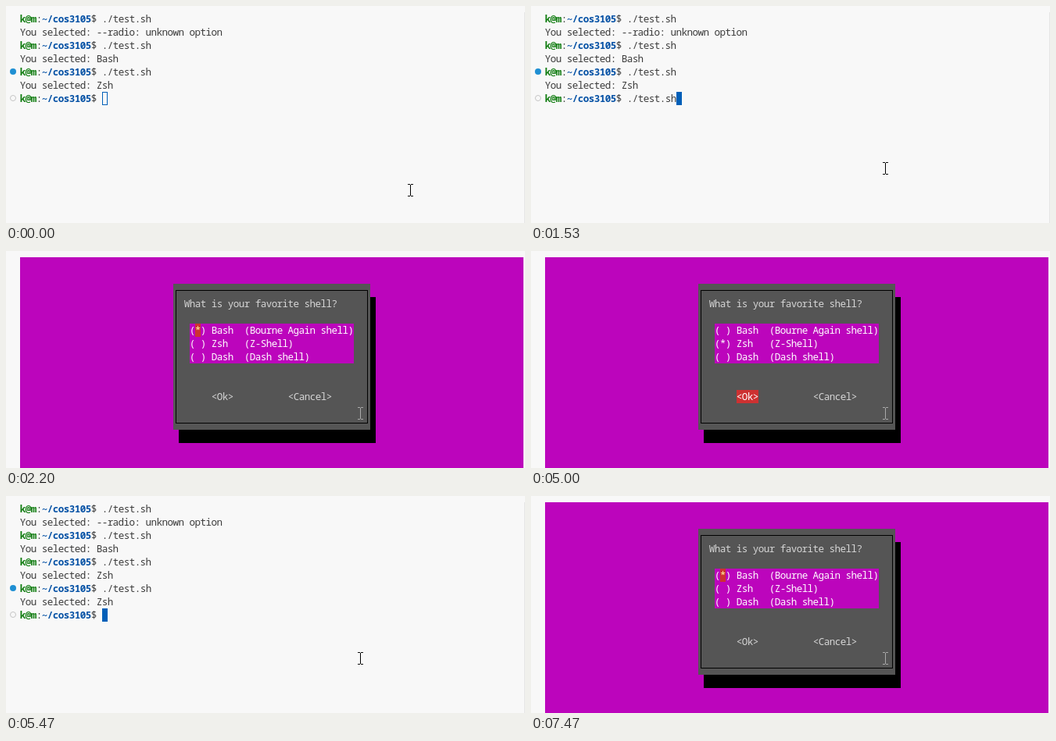
Animation of 664x278 px, one loop 8 s. Source, as an HTML page:

```html
<!DOCTYPE html>
<html lang="en">
<head>
<meta charset="utf-8">
<title>Shell picker</title>
<style>
html, body { margin: 0; width: 100%; height: 100%; overflow: hidden; background: #f8f8f8; }
body {
  position: relative; color: #3b3b3b;
  font: 500 12.6px/17px "Noto Sans Mono", "DejaVu Sans Mono", monospace;
  letter-spacing: calc(7px - .6em);
}
div, i, svg { position: absolute; }
.row { left: calc(17.7px + var(--c, 0) * 7px); top: calc(8px + var(--r) * 17px); height: 17px; white-space: pre; }
b { color: #107c10; }
b + b { color: #0451a5; }
.layer { inset: 0; }
.anim { animation: 8s step-end infinite; }

.edge { right: 0; top: 8px; bottom: 0; width: 1px; background: #e5e5e5; }
.dot, .ring { border-radius: 50%; box-sizing: border-box; }
.dot { left: 4.7px; top: 79.7px; width: 8.6px; height: 8.6px; background: #1f8fd3; }
.ring { left: 5px; top: 114px; width: 8px; height: 8px; border: 1.6px solid #c4c4c4; }
.cursor { left: 123px; top: 110px; width: 7px; height: 17px; box-sizing: border-box; border: 1px solid #005fb8; animation-name: cursor; }
.term { animation-name: term; }
.live { animation-name: live; }
.later { animation-name: later; }
.cmd1 { animation-name: cmd1; }
.cmd2 { animation-name: cmd2; }

.dialog { color: #d6d6d6; animation-name: dialog; }
.back { left: 18px; top: 8px; width: 644px; bottom: 0; background: #bc05bc; }
.shadow, .box { width: 252px; height: 187px; }
.shadow { left: 221px; top: 59px; background: #000; }
.box { left: 214px; top: 42px; background: #555; }
.frame { left: 217px; top: 50px; width: 244px; height: 169px; border: 1px solid #000; }
.list { left: 235px; top: 93px; width: 210px; height: 51px; background: #bc05bc; }
.item { color: #fff; }
.hot, .pick { height: 17px; background: #cd3131; }
.hot { left: 242px; top: 93px; width: 7px; animation-name: hot; }
.star { animation-name: star; }
.pick { left: 263px; top: 178px; width: 28px; }
.ok { color: #fff; animation-name: ok; }

.mouse { left: 0; top: 0; width: 7px; height: 16px; animation: move 8s infinite, tint 8s step-end infinite; }

@keyframes term { 0%, 68.375% { opacity: 1 } 27.5%, 93.375%, 100% { opacity: 0 } }
@keyframes dialog { 0%, 68.375% { opacity: 0 } 27.5%, 93.375%, 100% { opacity: 1 } }
@keyframes live { 0% { transform: none } 68.375%, 100% { transform: translateY(34px) } }
@keyframes later { 0% { opacity: 0 } 68.375%, 100% { opacity: 1 } }
@keyframes cmd1 { 0% { opacity: 0 } 19.125%, 100% { opacity: 1 } }
@keyframes cmd2 { 0% { opacity: 0 } 89.125%, 100% { opacity: 1 } }
@keyframes cursor {
  0% { background: transparent; transform: none }
  5.875%, 68.375% { background: #005fb8; transform: none }
  19.125%, 89.125%, 100% { background: #005fb8; transform: translateX(63px) }
}
@keyframes hot {
  0%, 93.375%, 100% { opacity: 1; transform: none }
  38.375% { opacity: 1; transform: translateY(17px) }
  62.5% { opacity: 0; transform: none }
}
@keyframes star {
  0%, 93.375%, 100% { color: #fff3a0; transform: none }
  38.375% { color: #fff; transform: none }
  48.375% { color: #fff3a0; transform: translateY(17px) }
  62.5% { color: #fff; transform: translateY(17px) }
}
@keyframes ok { 0%, 93.375%, 100% { opacity: 0 } 62.5% { opacity: 1 } }
@keyframes move {
  0%, .0625% { transform: translate(514px, 228px); animation-timing-function: steps(5, end) }
  4.125%, 100% { transform: translate(450px, 200px) }
}
@keyframes tint { 0%, 68.375% { fill: #000 } 27.5%, 93.375%, 100% { fill: #aaa } }
</style>
</head>
<body>
<div class="layer anim term">
  <i class="edge"></i>
  <div class="row" style="--r:0"><b>k@m</b>:<b>~/cos3105</b>$ ./test.sh</div>
  <div class="row" style="--r:1">You selected: --radio: unknown option</div>
  <div class="row" style="--r:2"><b>k@m</b>:<b>~/cos3105</b>$ ./test.sh</div>
  <div class="row" style="--r:3">You selected: Bash</div>
  <div class="row" style="--r:4"><b>k@m</b>:<b>~/cos3105</b>$ ./test.sh</div>
  <div class="row" style="--r:5">You selected: Zsh</div>
  <div class="row" style="--r:6"><b>k@m</b>:<b>~/cos3105</b>$ <span class="anim cmd1">./test.sh</span></div>
  <div class="layer anim later">
    <div class="row" style="--r:7">You selected: Zsh</div>
    <div class="row" style="--r:8"><b>k@m</b>:<b>~/cos3105</b>$ <span class="anim cmd2">./test.sh</span></div>
  </div>
  <div class="layer anim live">
    <i class="dot"></i><i class="ring"></i><i class="cursor anim"></i>
  </div>
</div>

<div class="layer anim dialog">
  <i class="back"></i><i class="shadow"></i><i class="box"></i><i class="frame"></i><i class="list"></i>
  <i class="hot anim"></i>
  <div class="row" style="--r:3;--c:30">What is your favorite shell?</div>
  <div class="row item" style="--r:5;--c:31">( ) Bash  (Bourne Again shell)</div>
  <div class="row item" style="--r:6;--c:31">( ) Zsh   (Z-Shell)</div>
  <div class="row item" style="--r:7;--c:31">( ) Dash  (Dash shell)</div>
  <div class="row star anim" style="--r:5;--c:32">*</div>
  <div class="row" style="--r:10;--c:35">&lt;Ok&gt;</div>
  <div class="layer anim ok">
    <i class="pick"></i>
    <div class="row" style="--r:10;--c:35">&lt;Ok&gt;</div>
  </div>
  <div class="row" style="--r:10;--c:49">&lt;Cancel&gt;</div>
</div>

<svg class="mouse" viewBox="0 0 7 16" shape-rendering="crispEdges">
  <path d="M0 0h3v1h1v-1h3v1h-3v14h3v1h-3v-1h-1v1h-3v-1h3v-14h-3z"/>
</svg>
</body>
</html>
```
